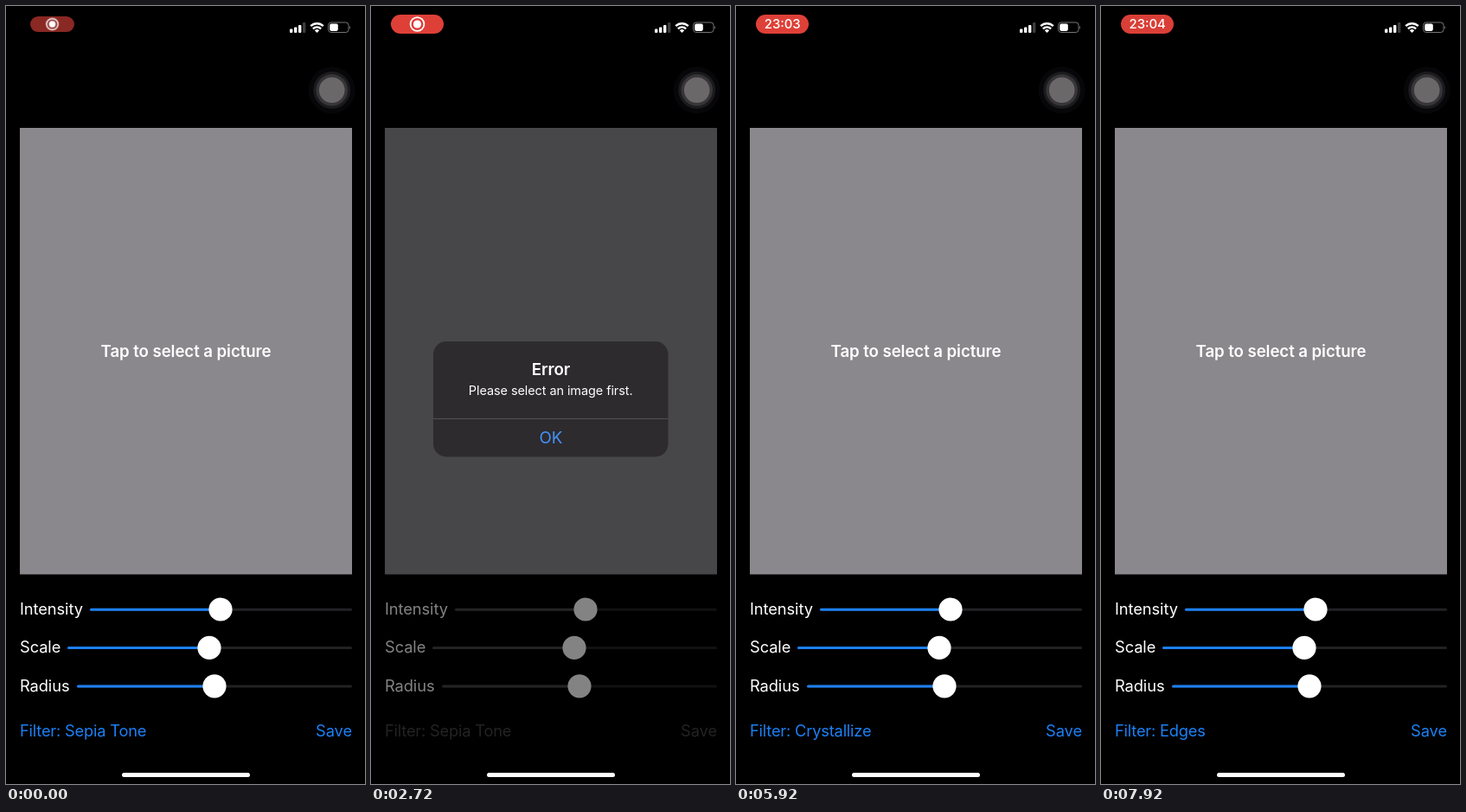
An HTML page for the animation above (8000 ms loop, 415 by 900 pixels).

```html
<!DOCTYPE html>
<html lang="en">
<head>
<meta charset="utf-8">
<title>Photo filter app</title>
<style>
/* One loop is 8 s, so 1% of every timeline is 80 ms. */
@property --dim { syntax: "<number>"; inherits: true; initial-value: 0; }

html, body { margin: 0; width: 100%; height: 100%; overflow: hidden; background: #000; }
svg {
  display: block; width: 415px; height: 900px;
  font: 400 18.3px Inter, "Liberation Sans", sans-serif;
  letter-spacing: -.005em;
  animation: dim 8s infinite;
  --tint: color-mix(in srgb, #444 calc(var(--dim) * 100%), #1c80f5);
}
.mid { text-anchor: middle; }
.end { text-anchor: end; }
.bold { font-weight: 600; }
.prompt { font-size: 18.7px; }
.small { font-size: 14.5px; }
.tint { fill: var(--tint); }
.link { fill: #4592f8; }

.shade { opacity: calc(var(--dim) * .485); }
.save { animation: press-save 8s infinite; }
.filter { letter-spacing: -.011em; animation: press-filter 8s infinite; }
.name { animation: 8s step-end infinite; }
.sepia { animation-name: first-name; }
.crystal { animation-name: second-name; }
.edges { animation-name: third-name; }

.alert { transform-origin: 207.5px 455px; animation: alert 8s infinite; }
.trace { animation: trace 8s infinite; }
.sheet { animation: sheet 8s infinite; }
.row { font-size: 21.2px; letter-spacing: -.024em; }
.cancel { font-size: 21.5px; letter-spacing: 0; }
.hit { opacity: 0; animation: 8s step-end infinite; }
.hit0 { animation-name: hit-first; }
.hit1 { animation-name: hit-second; }

.pill { transform-origin: 53.5px 21px; animation: grow 8s infinite; }
.glow { animation: glow 8s ease-in-out infinite; }
.icon { animation: icon 8s infinite; }
.clock { font-size: 14.9px; font-weight: 500; letter-spacing: 0; animation: clock 8s infinite; }
.early { animation: early 8s step-end infinite; }
.late { animation: late 8s step-end infinite; }

@keyframes dim {
  0%, 11.5%, 44.5%, 48.75%, 71.25%, 77.75%, 95.5%, 100% { --dim: 0; }
  16%, 40%, 53%, 66.25%, 82%, 90% { --dim: 1; }
}
@keyframes alert {
  0%, 11.5% { opacity: 0; transform: scale(1.18); animation-timing-function: cubic-bezier(.2, .8, .25, 1); }
  16.5%, 40% { opacity: 1; transform: none; }
  44.5%, 100% { opacity: 0; transform: none; }
}
@keyframes trace {
  0%, 43% { opacity: 0; }
  44.5%, 48.5% { opacity: .07; }
  49.5%, 100% { opacity: 0; }
}
@keyframes sheet {
  0%, 48.75%, 71.25%, 77.75%, 95.5%, 100% {
    transform: translateY(620px);
    animation-timing-function: cubic-bezier(.25, .8, .25, 1);
  }
  55%, 66.25%, 84%, 90% {
    transform: none;
    animation-timing-function: cubic-bezier(.35, .2, .25, 1);
  }
}
@keyframes hit-first { 0% { opacity: 0; } 64% { opacity: 1; } 66.75% { opacity: 0; } }
@keyframes hit-second { 0% { opacity: 0; } 87% { opacity: 1; } 90.5% { opacity: 0; } }
@keyframes press-save {
  0%, 8% { opacity: 1; }
  8.5%, 10.5% { opacity: .4; }
  12.5%, 100% { opacity: 1; }
}
@keyframes press-filter {
  0%, 46.5%, 50.5%, 75.5%, 79.5%, 100% { opacity: 1; }
  47%, 48.75%, 76%, 77.75% { opacity: .5; }
}
@keyframes first-name { 0% { opacity: 1; } 71.25%, 100% { opacity: 0; } }
@keyframes second-name { 0% { opacity: 0; } 71.25% { opacity: 1; } 95.5%, 100% { opacity: 0; } }
@keyframes third-name { 0% { opacity: 0; } 95.5%, 100% { opacity: 1; } }
@keyframes grow { 0% { transform: scale(.836, .82); } 6%, 100% { transform: none; } }
@keyframes glow {
  0% { opacity: .55; }
  8%, 48%, 88% { opacity: 1; }
  16%, 30%, 56%, 70%, 96%, 100% { opacity: .87; }
}
@keyframes icon { 0%, 37% { opacity: 1; } 39%, 100% { opacity: 0; } }
@keyframes clock { 0%, 38% { opacity: 0; } 40%, 100% { opacity: 1; } }
@keyframes early { 0% { opacity: 1; } 80%, 100% { opacity: 0; } }
@keyframes late { 0% { opacity: 0; } 80%, 100% { opacity: 1; } }
</style>
</head>
<body>
<svg viewBox="0 0 415 900" fill="#fff">
  <defs>
    <linearGradient id="glass" x2="0" y2="1">
      <stop offset="0" stop-color="#2c2b2d"/>
      <stop offset=".62" stop-color="#302e30"/>
      <stop offset=".7" stop-color="#28272a"/>
      <stop offset=".79" stop-color="#1c1b1f"/>
      <stop offset="1" stop-color="#161518"/>
    </linearGradient>
    <linearGradient id="pressed">
      <stop offset="0" stop-color="#47494c"/>
      <stop offset=".12" stop-color="#4f4f50"/>
      <stop offset=".88" stop-color="#4f4f50"/>
      <stop offset="1" stop-color="#47494c"/>
    </linearGradient>
  </defs>
  <rect width="415" height="900" fill="#000"/>

  <g>
    <rect x="16" y="141" width="384" height="516.5" fill="#8a888d"/>
    <text class="mid bold prompt" x="208" y="406">Tap to select a picture</text>
    <g id="sliders"></g>
    <g class="filter tint">
      <text class="name sepia" x="16" y="845">Filter: Sepia Tone</text>
      <text class="name crystal" x="16" y="845">Filter: Crystallize</text>
      <text class="name edges" x="16" y="845">Filter: Edges</text>
    </g>
    <text class="save tint end" x="400" y="845">Save</text>
  </g>

  <rect class="shade" width="415" height="900" fill="#000"/>

  <g class="alert">
    <rect x="72" y="388" width="271.5" height="133.5" rx="15" fill="#2d2b2e"/>
    <g id="message" class="mid">
      <text class="bold" x="208" y="427" font-size="18.8">Error</text>
      <text class="small" x="207.7" y="450">Please select an image first.</text>
    </g>
    <path d="M72 477.5H343.5" stroke="#515055"/>
    <text class="mid link" x="208" y="506" font-size="18.8">OK</text>
  </g>
  <use class="trace" href="#message" fill="#000"/>

  <g class="sheet">
    <rect x="8" y="289" width="400" height="511" rx="14" fill="url(#glass)"/>
    <text class="mid small" x="208" y="319" fill="#98979b">Select a filter</text>
    <g id="rows" class="mid row"></g>
    <rect x="8" y="809" width="400" height="57" rx="14" fill="#29282a"/>
    <text class="mid bold link cancel" x="208" y="845.5">Cancel</text>
  </g>

  <g class="pill">
    <rect class="glow" x="23" y="10" width="61" height="22" rx="11" fill="#fc4940"/>
    <g class="icon">
      <circle cx="53.5" cy="21" r="7.9" fill="none" stroke="#fff" stroke-width="1.8"/>
      <circle cx="53.5" cy="21" r="4.6"/>
    </g>
    <g class="clock mid">
      <text class="early" x="53.7" y="26.4">23:03</text>
      <text class="late" x="53.7" y="26.4">23:04</text>
    </g>
  </g>

  <g>
    <rect x="328" y="26.5" width="3.4" height="4.5" rx="1"/>
    <rect x="333" y="24.5" width="3.4" height="6.5" rx="1"/>
    <rect x="338" y="22" width="3.4" height="9" rx="1"/>
    <rect x="343" y="19" width="3.4" height="12" rx="1" fill="#3c3c3c"/>
    <g fill="none" stroke="#fff" stroke-width="2.4">
      <path d="M352.2 23.2a10.4 10.4 0 0 1 14.6 0"/>
      <path d="M354.9 26.3a6.5 6.5 0 0 1 9.2 0"/>
    </g>
    <path d="M359.5 31l-2.7-2.7a3.8 3.8 0 0 1 5.4 0z"/>
    <rect x="372.6" y="19" width="23.4" height="11.5" rx="3.2" fill="none" stroke="#777"/>
    <rect x="374.2" y="20.6" width="9.6" height="8.3" rx="1.8"/>
    <path d="M397.2 22.8q1.7 2 0 4z" fill="#888"/>
  </g>

  <g>
    <circle cx="376.7" cy="97.3" r="27" fill="#070709"/>
    <circle cx="376.7" cy="97.3" r="21.5" fill="#1b1a1c"/>
    <circle cx="376.7" cy="97.3" r="18.3" fill="#373537"/>
    <circle cx="376.7" cy="97.3" r="14.8" fill="#6b686a"/>
  </g>
  <rect x="134" y="887" width="148" height="5" rx="2.5"/>
</svg>
<script>
const fill = (id, items, draw) => {
  document.getElementById(id).innerHTML = items.map(draw).join("");
};

fill("sliders", [["Intensity", 97, 248], ["Scale", 71, 235], ["Radius", 82, 241]], ([label, left, knob], i) => {
  const y = 698 + i * 44.4;
  const bar = (x, end, paint) => `<rect x="${x}" y="${y - 1.3}" width="${end - x}" height="3" rx="1.5" ${paint}/>`;
  return `<text x="16" y="${y + 6}">${label}</text>` +
    bar(left, 400, 'fill="#222224"') + bar(left, knob, 'class="tint"') +
    `<circle cx="${knob}" cy="${y}" r="13.6"/>`;
});

const filters = ["Crystallize", "Edges", "Gaussian Blur", "Pixellate", "Sepia Tone", "Unsharp Mask", "Vignette", "Gloom"];
const lines = ["#444347", "#626165", "#49484c", "#333135", "#464549", "#626165", "#3c3b40", "#1f1e23"];
fill("rows", filters, (name, i) => {
  const top = 338.5 + i * 57.75;
  const hit = i < 2 ? `<rect class="hit hit${i}" x="8" y="${top}" width="400" height="57.5" fill="url(#pressed)"/>` : "";
  return `<path d="M8 ${Math.floor(top) + .5}H408" stroke="${lines[i]}"/>${hit}` +
    `<text class="link" x="207.6" y="${top + 37.2}">${name}</text>`;
});
</script>
</body>
</html>
```
